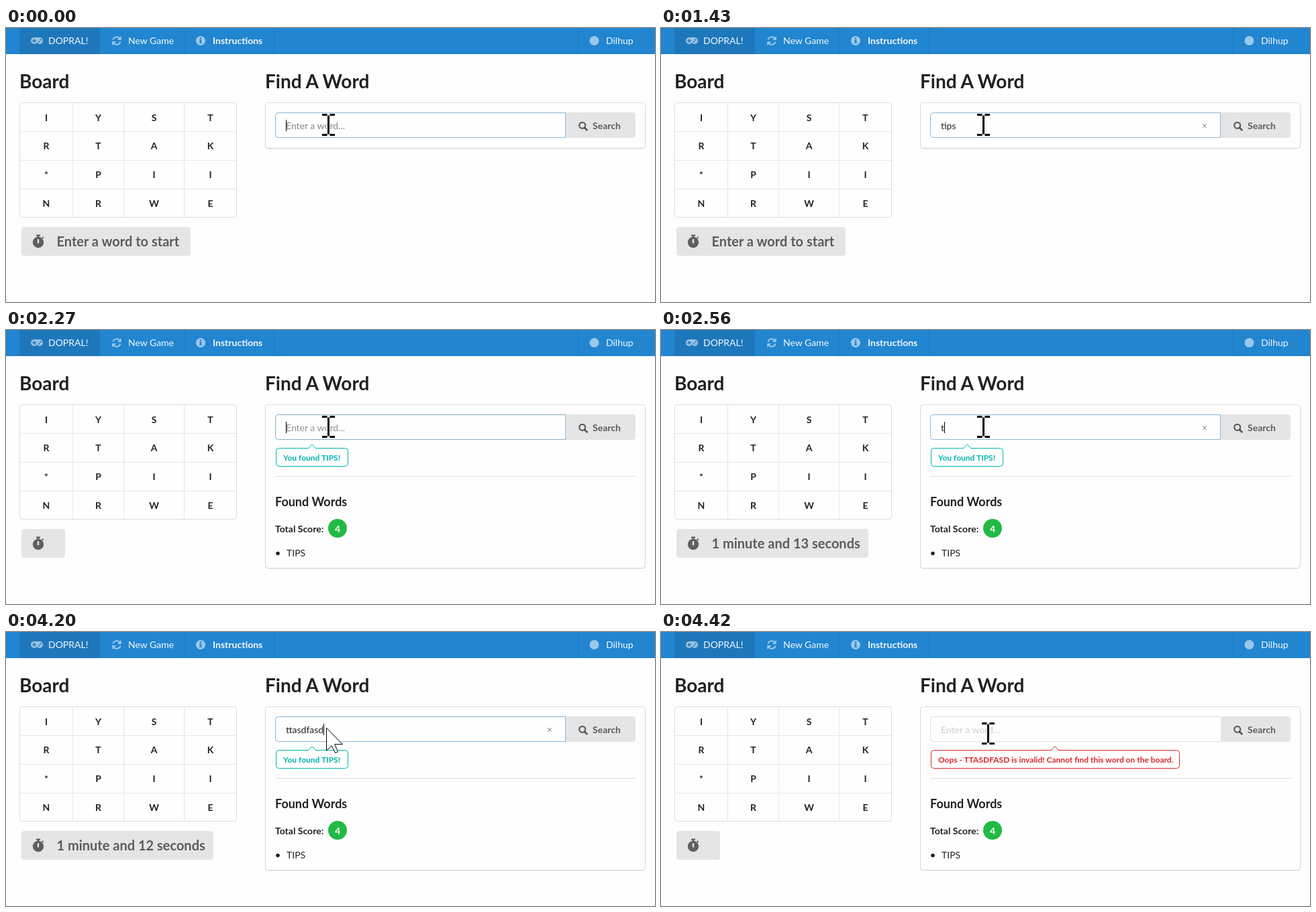
Recreate the animation shown at these times as an HTML page. Size 967 by 409 pixels, loop 4.5 s.

```html
<!DOCTYPE html>
<html lang="en">
<head>
<meta charset="utf-8">
<title>Word game</title>
<style>
  html, body { margin: 0; width: 100%; height: 100%; overflow: hidden; background: #fefefe; }
  svg { display: block; width: 967px; height: 409px; font: 400 14px Lato, sans-serif; }
  text { fill: rgba(0, 0, 0, .87); white-space: pre; }
  .bold { font-weight: 700; }
  .mid { text-anchor: middle; }
  .line { fill: none; stroke: rgba(34, 36, 38, .15); }
  .thin { fill: none; stroke: rgba(34, 36, 38, .1); }
  #nav text { fill: currentColor; }
  #search text { fill: currentColor; }
</style>
</head>
<body>
<svg viewBox="0 0 967 409" xmlns="http://www.w3.org/2000/svg">
  <rect width="967" height="409" fill="#fefefe"/>

  <rect width="967" height="39" fill="#2185d0"/>
  <rect id="active" x="21" width="118" height="39" fill="#000"/>
  <path class="thin" d="M20.500 0V39M139.500 0V39M265.500 0V39M399.500 0V39M852.500 0V39"/>
  <g id="nav">
    <g id="navIcons" fill="currentColor">
      <path fill-rule="evenodd" d="M42 14H50a5 5 0 0 1 0 10C48 24 47.500 23 46.500 22h-1C44.500 23 44 24 42 24a5 5 0 0 1 0-10Z
        M41.300 16.200v2h-2v1.600h2v2h1.600v-2h2v-1.600h-2v-2Z
        M49 19.300a1.200 1.200 0 1 0 .1 0ZM51.500 16.400a1.200 1.200 0 1 0 .1 0Z"/>
      <path d="M159.500 17.500A5.700 5.700 0 0 1 169.200 15M170.500 20.500A5.700 5.700 0 0 1 160.800 23" fill="none" stroke="currentColor" stroke-width="2"/>
      <path d="M171.800 12v6h-6ZM158.200 26v-6h6Z"/>
      <path fill-rule="evenodd" d="M290 12a7 7 0 1 0 .01 0ZM288.800 14.200h2.400v2.300h-2.400ZM288.200 17.600h3v3.600h.8v1.500h-4v-1.500h.9v-2.100h-.7Z"/>
      <circle cx="876.500" cy="19" r="7"/>
    </g>
    <text x="63" y="24">DOPRAL!</text>
    <text x="182" y="24">New Game</text>
    <text x="308" y="24" class="bold">Instructions</text>
    <text x="894" y="24">Dilhup</text>
  </g>

  <text x="20" y="90" class="bold" font-size="28">Board</text>
  <text x="386" y="90" class="bold" font-size="28">Find A Word</text>

  <path class="thin" d="M99.500 112V282M175.500 112V282M265.500 112V282M21 154.500H343M21 197.500H343M21 240.500H343"/>
  <rect class="line" x="20.500" y="111.500" width="323" height="171" rx="4"/>
  <g id="letters" class="bold mid"></g>

  <rect id="timerBox" x="23" y="297" height="43" rx="4" fill="#e5e5e5"/>
  <g fill="#5f5f5f">
    <path d="M45 308.500h6v2.200h-6ZM46.800 310h2.400v3h-2.400ZM53 312.700l1.500-1.500 1.900 1.900-1.500 1.500Z"/>
    <circle cx="48" cy="320" r="8.200"/>
    <rect x="46.800" y="315" width="2.400" height="6.500" rx="1" fill="#e8e8e8"/>
  </g>
  <text id="timer" x="75.500" y="326" class="bold" font-size="20" style="fill:rgba(0,0,0,.6)"></text>

  <rect id="cardShadow" x="387" y="113" width="565" rx="4" fill="none" stroke="rgba(34,36,38,.07)" stroke-width="2"/>
  <rect id="card" class="line" x="386.500" y="111.500" width="566" rx="4" style="fill:#fefefe"/>

  <path id="button" d="M834 126H934q4 0 4 4V160q0 4-4 4H834Z" fill="#e5e5e5"/>
  <path id="border" d="M833.500 126.500H405.500q-4 0-4 4V159.500q0 4 4 4H833.500" fill="none"/>
  <path id="edge" d="M833.500 126V164"/>
  <g id="search">
    <circle cx="858.700" cy="145.300" r="4.500" fill="none" stroke="currentColor" stroke-width="2.200"/>
    <path d="M862 148.700l4.300 4.300" stroke="currentColor" stroke-width="2.800"/>
    <text x="874" y="151" class="bold">Search</text>
  </g>
  <text id="hint" x="417" y="151">Enter a word...</text>
  <text id="typed" x="417" y="151"></text>
  <path id="clear" d="M807.200 143.200l5.600 5.600M812.800 143.200l-5.600 5.600" stroke="#777"/>
  <rect id="caret" y="137" width="1" height="17"/>

  <g id="results">
    <rect id="bubble" x="402.500" y="176.500" height="27" rx="4" fill="#fefefe"/>
    <path id="pointer" d="M-6 177L0 170.500 6 177" fill="#fefefe"/>
    <text id="message" x="413" y="195" class="bold" font-size="12"></text>
    <path class="line" d="M401 218.500H938"/>
    <text x="401" y="263" class="bold" font-size="18">Found Words</text>
    <text x="401" y="302" class="bold">Total Score:</text>
    <g id="score">
      <circle cx="494" cy="296" r="14" fill="#21ba45"/>
      <text x="494" y="301.500" class="bold mid" style="fill:#fff">4</text>
    </g>
    <circle cx="405" cy="333.500" r="2.800" fill="#222"/>
    <text x="418" y="338">TIPS</text>
  </g>

  <g id="beam">
    <path d="M-9.500-15.500H-2M2-15.500H9.500M-9.500 14.500H-2M2 14.500H9.500M0-14.500V13.500" stroke="#fefefe" stroke-width="5"/>
    <path d="M-9.500-15.500H-2M2-15.500H9.500M-9.500 14.500H-2M2 14.500H9.500M0-14.500V13.500" stroke="#000" stroke-width="3"/>
  </g>
  <path id="arrow" d="M477.500 143V177L485.300 169.800 490.500 180.500 494.500 178.700 489.700 167.700H501.300Z" fill="#fff" stroke="#000"/>
</svg>
<script>
const LOOP = 4500;
const $ = id => document.getElementById(id);
const set = (id, attrs) => {
  for (const name in attrs) $(id).setAttribute(name, attrs[name]);
};
const show = (id, on) => set(id, { opacity: +on });

// Latest value whose start time has passed.
const at = (track, t) => {
  let value = track[0][1];
  for (const [start, next] of track) if (t >= start) value = next;
  return value;
};
const lerp = (a, b, u) => a + (b - a) * u;
const mix = (a, b, u) => `rgba(${a.map((v, i) => lerp(v, b[i], u)).join()})`;

const typing = [[0, ''], [60, 't'], [440, 'ti'], [520, 'tip'], [600, 'tips'], [1510, ''],
  [2560, 't'], [2790, 'tt'], [2860, 'tta'], [2940, 'ttas'], [3080, 'ttasdf'],
  [3240, 'ttasdfas'], [3300, 'ttasdfasd'], [4280, '']];
const caretAlpha = [[0, 1], [980, .6], [1060, .25], [1130, 0], [2270, 1],
  [3690, .6], [3760, .25], [3830, 0], [4200, 1], [4280, 0]];
const clearAlpha = [[0, 0], [60, .5], [130, 1], [1510, 0], [2560, 1], [4280, 0]];
const pageReady = [[0, 1], [1510, 0], [1590, .5], [1650, 1], [4280, 0], [4350, .5], [4420, 1]];
const focusLevel = [[0, 1], [1510, 0], [2270, .85], [2360, 1], [4280, 0]];
const pointerKind = [[0, 'beam'], [1200, 'arrow'], [1430, 'beam'], [3970, 'arrow'], [4280, 'beam']];
const timerText = [[0, 'Enter a word to start'], [1510, ''], [2560, '1 minute and 13 seconds'],
  [3460, '1 minute and 12 seconds'], [4280, '']];
const timerWidth = [[0, 252], [1510, 65], [2560, 286], [4280, 65]];

const DARK = [85, 85, 85, 1], SOFT = [34, 36, 38, .15], BLUE = [133, 183, 217, 1];

['IYST', 'RTAK', '*PII', 'NRWE'].forEach((row, r) => [...row].forEach((letter, c) => {
  const cell = document.createElementNS('http://www.w3.org/2000/svg', 'text');
  cell.setAttribute('x', [60, 137.5, 220.5, 304.5][c]);
  cell.setAttribute('y', [139, 181, 224, 267][r]);
  cell.textContent = letter;
  $('letters').append(cell);
}));

function drawNav(ready) {
  set('nav', { color: mix([10, 94, 203, 1], [255, 255, 255, .95], ready) });
  set('navIcons', { opacity: lerp(.9, .58, ready) });
  set('active', { opacity: .1 * ready });
}

function drawInput(t, ready) {
  const focus = at(focusLevel, t);
  const word = at(typing, t);
  const focused = focus > 0;
  $('typed').textContent = word;
  show('hint', !word);
  $('hint').style.fill = mix([191, 191, 191, .75], [115, 115, 115, .87], focus);
  set('border', { stroke: focused ? mix(SOFT, BLUE, focus) : mix(DARK, SOFT, ready) });
  set('edge', { stroke: focused ? mix([133, 183, 217, 0], BLUE, focus) : mix(DARK, [34, 36, 38, 0], ready) });
  set('button', { opacity: ready });
  set('search', { color: mix([0, 0, 0, .82], [0, 0, 0, .6], ready) });
  show('clear', at(clearAlpha, t));
  const width = word ? $('typed').getComputedTextLength() : 0;
  set('caret', { x: Math.round(417 + width), opacity: at(caretAlpha, t) });
}

function drawResults(t, ready) {
  const open = t >= 1510;
  const failed = t >= 4280;
  const height = open ? 244 : 68;
  const color = failed ? '#db2828' : '#00b5ad';
  set('card', { height });
  set('cardShadow', { height: height - 1 });
  show('results', open);
  set('bubble', { width: failed ? 370 : 107, stroke: color });
  set('pointer', { transform: `translate(${failed ? 587 : 456})`, stroke: color });
  $('message').textContent = failed
    ? 'Oops - TTASDFASD is invalid! Cannot find this word on the board.'
    : 'You found TIPS!';
  $('message').style.fill = color;
  show('score', ready);
}

function draw(t) {
  const ready = at(pageReady, t);
  drawNav(ready);
  drawInput(t, ready);
  drawResults(t, ready);
  $('timer').textContent = at(timerText, t);
  set('timerBox', { width: at(timerWidth, t), opacity: ready });
  const kind = at(pointerKind, t);
  show('beam', kind === 'beam');
  show('arrow', kind === 'arrow');
  set('beam', { transform: t >= 4280 ? 'translate(487.500 152)' : 'translate(480.500 145)' });
}

const begin = performance.now();
function tick() {
  draw((performance.now() - begin) % LOOP);
  requestAnimationFrame(tick);
}
tick();
</script>
</body>
</html>
```
